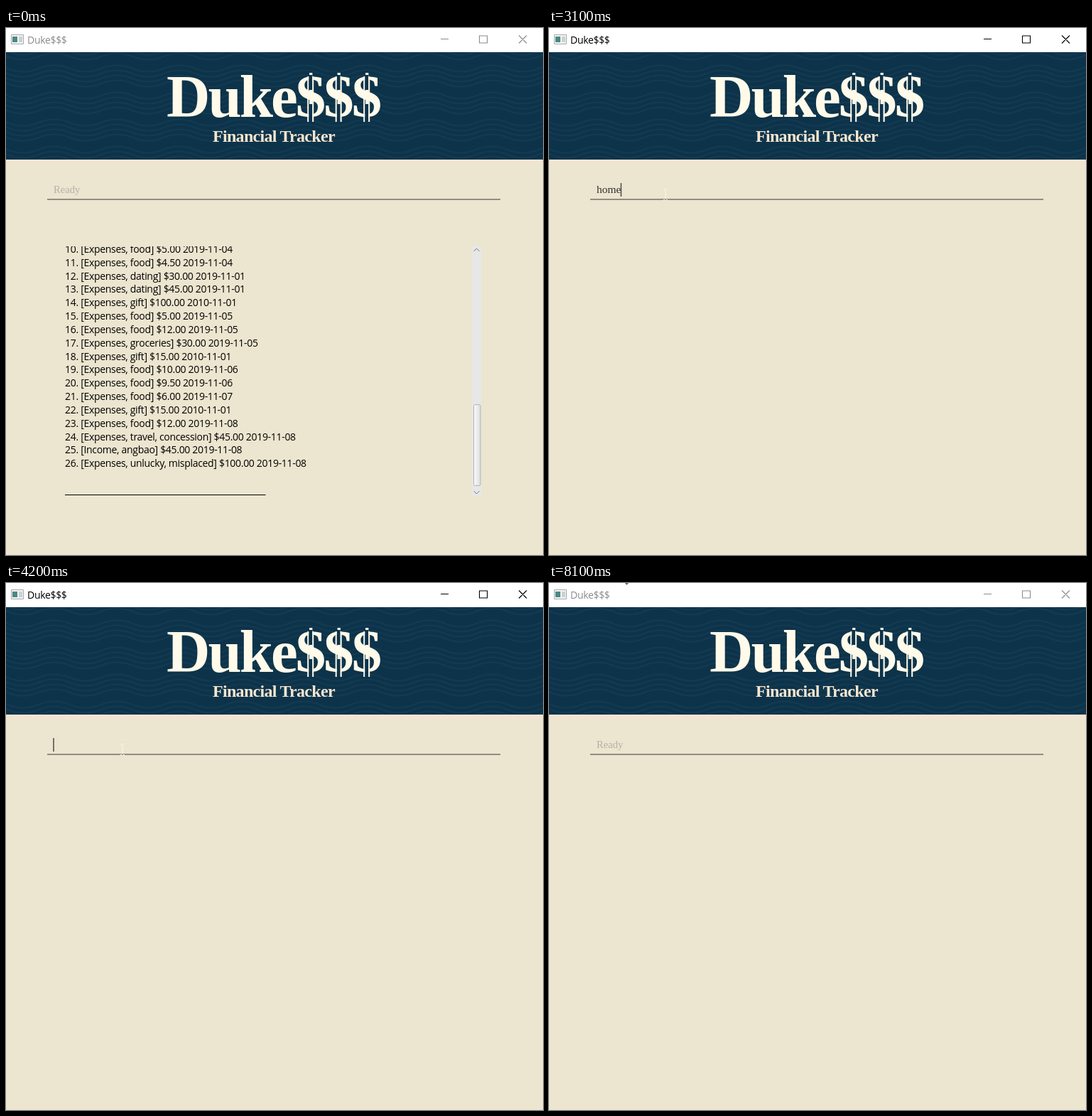
Recreate the animation shown at these times as an HTML page. Size 756 by 741 pixels, loop 8.2 s.

```html
<!DOCTYPE html>
<html lang="en">
<head>
<meta charset="utf-8">
<title>Duke$$$</title>
<style>
  html, body { margin: 0; width: 100%; height: 100%; overflow: hidden; background: #ece5cf; }
  svg { display: block; }
  text { white-space: pre; }
  .ui { font-family: "Open Sans", "Noto Sans", sans-serif; font-size: 14px; letter-spacing: -.31px; }
  .serif { font-family: "Liberation Serif", "Noto Serif", serif; }
  .bold { font-weight: bold; }
  .brand { font-size: 85px; letter-spacing: -3px; fill: #fffaea; }
  .tagline { font-size: 24px; letter-spacing: -.7px; fill: #f8e6cf; }
  .navy { fill: #123b52; font-size: 12.5px; }
  .gold { fill: #f7b945; font-size: 56px; }
  .line { fill: none; stroke: #000; }
</style>
</head>
<body>
<svg width="756" height="741" viewBox="0 0 756 741">
  <defs>
    <pattern id="waves" x="-20" y="34" width="88" height="38" patternUnits="userSpaceOnUse">
      <g id="ripples" fill="none" stroke="#123a51" stroke-width="2"></g>
    </pattern>
    <linearGradient id="strip" x2="0" y2="1">
      <stop stop-color="#f6e4d4"/><stop offset="1" stop-color="#ece5cf"/>
    </linearGradient>
    <linearGradient id="thumb">
      <stop stop-color="#fafafa"/><stop offset="1" stop-color="#dedede"/>
    </linearGradient>
    <clipPath id="listClip"><path d="M60 307H656V661H60Z"/></clipPath>
  </defs>

  <path fill="#ece5cf" d="M0 0H756V741H0Z"/>
  <path fill="#fff" d="M0 0H756V34H0Z"/>
  <path fill="#0d334a" d="M0 34H756V185H0Z"/>
  <path fill="url(#waves)" d="M0 34H756V185H0Z"/>
  <path fill="url(#strip)" d="M0 185H756V193H0Z"/>

  <path fill="#f4f4f4" stroke="#a5a9ab" d="M7.5 9.5H24.5V22.5H7.5Z"/>
  <path fill="#4a8a82" d="M9 12H16V20H9Z"/>
  <path fill="#c9d3d3" d="M18 12H23V20H18Z"/>
  <g id="chrome">
    <text class="ui" x="30" y="21.5">Duke$$$</text>
    <path fill="none" stroke="currentColor" stroke-width="1.1"
      d="M612 15.5H623M666.5 11H677.5V21H666.5ZM722 10.5L733 21.5M733 10.5L722 21.5"/>
  </g>

  <text class="serif bold brand" x="226" y="125">Duke$$$</text>
  <g id="strokes"></g>
  <text class="serif bold tagline" x="291" y="160">Financial Tracker</text>

  <path fill="#918d83" d="M58 240H696V242H58Z"/>
  <text id="prompt" class="serif" x="67" y="231.5" font-size="14.6" fill="#b4b1aa">Ready</text>
  <text id="input" class="serif" x="67" y="231.5" font-size="15.5" fill="#33322f"></text>
  <path id="caret" stroke="#4c4a46" stroke-width="1.5" d="M0 218V237"/>

  <g id="list">
    <g id="entries" clip-path="url(#listClip)"></g>
    <path class="line" d="M83 656.5H365.5"/>
    <path fill="#e7e7e6" d="M655.5 306H669.5V659H655.5Z"/>
    <rect x="658.5" y="529.5" width="9.5" height="114" rx="2" fill="url(#thumb)" stroke="#b3b3b3"/>
    <path class="line" style="stroke:#777" d="M658.5 314L662.5 310L666.5 314M658.5 651L662.5 655L666.5 651"/>
  </g>

  <g id="home">
    <text class="serif navy" x="58" y="294">BALANCE:</text>
    <text class="serif navy" x="449" y="294">STATS:</text>
    <g id="ring" transform="rotate(-90 209 395)" fill="none" stroke-width="22"></g>
    <text class="serif gold" x="145" y="405" style="font-size:42px">$</text>
    <text class="serif gold" x="168" y="416">4</text>
    <text class="serif gold" x="196" y="406">88</text>
    <text class="serif navy" x="247" y="418">left</text>
    <g id="bars"></g>
    <path stroke="#b6b7b3" d="M507.5 481V491M572.5 481V491M638.5 481V491M703.5 481V491"/>
    <path stroke="#b6b7b3" stroke-width="2" d="M467 480H743"/>
    <g id="tasks"></g>
    <path fill="#e7e7e6" d="M746.5 548H756V741H746.5Z"/>
    <rect x="748.5" y="562.5" width="12" height="86" rx="2" fill="url(#thumb)" stroke="#b3b3b3"/>
    <path class="line" style="stroke:#777" d="M748.5 555L752.5 551L756.5 555M748.5 737L752.5 741L756.5 737"/>
  </g>

  <path id="beam" fill="none" stroke="#fbf8ec"
    d="M-3 -7.5H-1M1 -7.5H3M0 -6.5V6.5M-3 7.5H-1M1 7.5H3"/>
  <path id="arrow" fill="#fff" stroke="#000"
    d="M.5 .5V16.5L4.2 13L6.8 18.7L9 17.7L6.5 12.2H11.5Z"/>
</svg>

<script>
const $ = id => document.getElementById(id);
const show = (id, on) => $(id).style.display = on ? '' : 'none';
const fill = (id, items, draw) => $(id).innerHTML = items.map(draw).join('');

fill('ripples', [-15, -8, -1, 6, 23, 30, 37, 44], y =>
  `<path d="M-22 ${y}Q0 ${y - 9} 22 ${y}T66 ${y}T110 ${y}"/>`);

// the dollar signs have two thin strokes instead of one thick one
fill('strokes', [428.7, 468.2, 507.7], x =>
  `<path stroke="#0d334a" stroke-width="5" d="M${x} 66V87M${x} 107V134"/>
   <path stroke="#fffaea" stroke-width="2" d="M${x - 3.5} 68V132M${x + 3.5} 68V132"/>`);

const entries = [
  'Expenses, food] $5.00 2019-11-04', 'Expenses, food] $4.50 2019-11-04',
  'Expenses, dating] $30.00 2019-11-01', 'Expenses, dating] $45.00 2019-11-01',
  'Expenses, gift] $100.00 2010-11-01', 'Expenses, food] $5.00 2019-11-05',
  'Expenses, food] $12.00 2019-11-05', 'Expenses, groceries] $30.00 2019-11-05',
  'Expenses, gift] $15.00 2010-11-01', 'Expenses, food] $10.00 2019-11-06',
  'Expenses, food] $9.50 2019-11-06', 'Expenses, food] $6.00 2019-11-07',
  'Expenses, gift] $15.00 2010-11-01', 'Expenses, food] $12.00 2019-11-08',
  'Expenses, travel, concession] $45.00 2019-11-08', 'Income, angbao] $45.00 2019-11-08',
  'Expenses, unlucky, misplaced] $100.00 2019-11-08'
];
fill('entries', entries, (entry, i) =>
  `<text class="ui" x="83" y="${316 + i * 18.83}">${i + 10}. [${entry}</text>`);

// start and end angle of each shade, clockwise from the top
const shades = [
  [0, 13, '#e2a6a3'], [13, 43, '#d99a97'], [43, 60, '#d2908d'], [60, 191, '#cc8785'],
  [191, 240, '#e0a945'], [240, 283, '#ebb658'], [283, 325, '#f1bd61'],
  [325, 348, '#ebb658'], [348, 360, '#e0a945']
];
fill('ring', shades, ([from, to, color]) =>
  `<circle cx="209" cy="395" r="84" pathLength="360" stroke="${color}"
    stroke-dasharray="${to - from} 360" stroke-dashoffset="${-from}"/>`);

fill('bars', [[480, 415, '#f2b447'], [545.5, 337, '#eba5ab'], [611, 415, '#eba5ab'], [676.5, 358, '#eba5ab']],
  ([x, y, color]) => `<rect x="${x}" y="${y}" width="53.5" height="${480 - y}" fill="${color}"/>
    <rect x="${x + 13}" y="${y}" width="24" height="${480 - y}" fill="#fff" opacity=".13"/>
    <rect x="${x + 45}" y="${y}" width="8.5" height="${480 - y}" opacity=".04"/>
    <rect x="${x}" y="${y - 1}" width="53.5" height="1.5" fill="#cfc9bd"/>`);

const tasks = [
  'TODO Refactor Code', 'EVENT Demo (at: today)',
  'DEADLINE Submit PPP (by: Monday)', 'TODO Have Mercy pls',
  'TODO Give Chance pls', 'EVENT Drinks on me (after: bug test)',
  'DEADLINE Find Love (before: Finding Death)', 'DEADLINE Death',
  'TODO Confess my undying love', 'EVENT Dig Grave (if: Rejection)',
  'EVENT Skip by the Beach (after: Finals)', 'TODO Border Crossing Cost'
];
fill('tasks', tasks, (task, i) => {
  const x = 59 + i % 2 * 322, y = 548.5 + (i >> 1) * 35.9;
  const [kind, ...words] = task.split(' ');
  return `<rect x="${x}" y="${y}" width="316" height="30.5" fill="#f2eee0"/>
    <text class="ui" x="${x + 6}" y="${y + 20.5}"><tspan class="bold">${kind}</tspan> ${words.join(' ')}</text>`;
});

const typing = [
  [0, ''], [1500, 'c'], [1600, 'cle'], [1700, 'clea'], [1800, 'clear'], [2300, ''],
  [2800, 'h'], [3000, 'hom'], [3100, 'home'], [3400, ''],
  [5100, 'c'], [5200, 'cl'], [5300, 'cle'], [5400, 'clea'], [5500, 'clear'], [7000, '']
];
const blinks = [
  [0, 0], [1100, 1], [3900, 0], [4200, 1], [4700, 0], [5100, 1], [6000, 0], [6600, 1], [7500, 0]
];
const pointer = [
  [500, 254, 340], [1000, 164, 234], [6000, 164, 234], [6100, 118, 253], [6200, 51, 226],
  [6300, 72, 162], [6400, 110, 196], [6500, 110, 196], [6600, 190, 250], [6700, 254, 284],
  [7500, 254, 284], [8100, 102, -17]
];
const latest = (track, t) => track.findLast(([start]) => start <= t);

function place(t) {
  const i = pointer.findIndex(([time]) => time >= t);
  if (i <= 0) return pointer[0].slice(1);
  const [t0, x0, y0] = pointer[i - 1], [t1, x1, y1] = pointer[i];
  const k = (t - t0) / (t1 - t0), ease = k * k * (3 - 2 * k);
  return [x0 + (x1 - x0) * ease, y0 + (y1 - y0) * ease];
}

function render(now) {
  const t = Math.floor(now % 8200 / 100) * 100;
  const active = t >= 1100 && t < 8000;
  const home = t >= 3400 && t < 4200;

  const color = active ? '#000' : '#8b8b8b';
  $('chrome').style.color = $('chrome').style.fill = color;
  show('prompt', !active);

  const text = latest(typing, t)[1];
  $('input').textContent = text;
  const end = 67 + (text ? $('input').getComputedTextLength() : 0);
  $('caret').setAttribute('transform', `translate(${end})`);
  show('caret', latest(blinks, t)[1]);

  show('list', t < 2300);
  show('home', home);
  $('bars').style.opacity = Math.min(1, .7 + .3 * (t - 3400) / 700);

  const [x, y] = place(t);
  const overField = x > 58 && x < 696 && y > 210 && y < 243;
  for (const [id, on] of [['beam', overField], ['arrow', !overField]]) {
    $(id).setAttribute('transform', `translate(${x} ${y})`);
    show(id, t >= 500 && on);
  }
}

function tick() {
  render(performance.now());
  requestAnimationFrame(tick);
}
tick();
</script>
</body>
</html>
```
